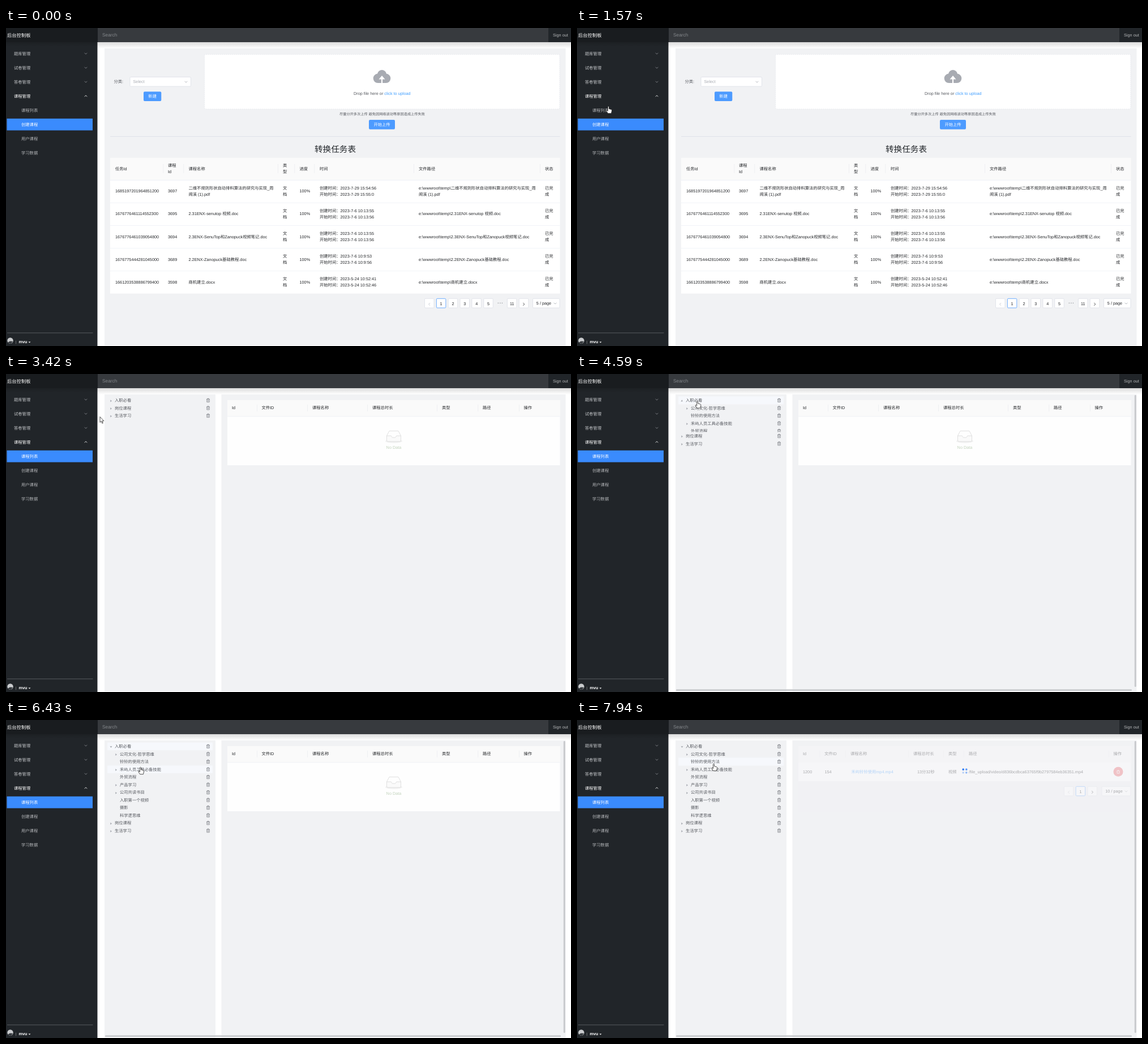
Write an HTML page that moves like this. It is 998 px wide and 561 px high and loops after 8 s.

```html
<!DOCTYPE html>
<html>
<head>
<meta charset="utf-8">
<title>后台控制板</title>
<style>
html, body { margin: 0; width: 998px; height: 561px; overflow: hidden; background: #fff; }
svg { display: block; }
text { font-family: "Liberation Sans", "Noto Sans CJK SC", "Noto Sans CJK", sans-serif; text-rendering: geometricPrecision; }
</style>
</head>
<body>
<script>
const PANEL = '#f1f2f4', BLUE = '#4d9bff', INK = '#26282b', GREY = '#56595f', EDGE = '#dcdfe6';
const ROW = 13.52, TREE_TOP = 39.75, CHILDREN = 9;

const rect = (x, y, w, h, fill, extra = '') =>
  `<rect x="${x}" y="${y}" width="${w}" height="${h}" fill="${fill}" ${extra}/>`;
const text = (x, y, s, fill = INK, size = 7.3, extra = '') =>
  `<text x="${x}" y="${y + size * .36}" font-size="${size}" fill="${fill}" ${extra}>${s}</text>`;
const centered = (x, y, s, fill, size) => text(x, y, s, fill, size, 'text-anchor="middle"');
const path = (d, stroke, x = 0, y = 0, extra = '') =>
  `<path d="${d}" transform="translate(${x} ${y})" fill="none" stroke="${stroke}" stroke-width=".8" ${extra}/>`;
const chevron = (x, y, color, up) => path(up ? 'M-2.3 1.2L0-1.2 2.3 1.2' : 'M-2.3-1.2L0 1.2 2.3-1.2', color, x, y);
const group = (id, body, extra = '') => `<g id="${id}" ${extra}>${body}</g>`;
const button = (x, y, w, label) => rect(x, y, w, 16.7, BLUE, 'rx="2"') + centered(x + w / 2, y + 8.3, label, '#fff');
const box = (x, y, w, h, stroke = EDGE) => rect(x, y, w, h, '#fff', `rx="1.5" stroke="${stroke}" stroke-width=".8"`);
const lines = (x, y, a, b) => b ? text(x, y - 5.8, a) + text(x, y + 5.8, b) : text(x, y, a);
const separators = (xs, y, h) => xs.map(x => rect(x, y, .7, h, '#e8eaee')).join('');

function pager(x, y, pages, selectX, selectW, label) {
  let out = '';
  ['<', ...pages, '>'].forEach((p, i) => {
    const px = x + i * 20.85, mid = px + 8.3, arrow = p === '<' || p === '>';
    if (p === '…') out += [-3.5, 0, 3.5].map(d => `<circle cx="${mid + d}" cy="${y + 8}" r=".8" fill="#909399"/>`).join('');
    else out += box(px, y, 16.5, 16.5, p === 1 ? BLUE : EDGE) + (arrow
      ? path(p === '<' ? 'M1.3-2.3L-1.3 0 1.3 2.3' : 'M-1.3-2.3L1.3 0-1.3 2.3', p === '<' ? '#c0c4cc' : INK, mid, y + 10)
      : centered(mid, y + 9, p));
  });
  return out + box(selectX, y, selectW, 16.5) + text(selectX + 6.3, y + 8, label) + chevron(selectX + selectW - 8, y + 8.5, '#a8abb2');
}

// Frame around the pages
const frame = () => {
  let out = rect(161.5, 25, 836.5, 11, 'url(#shade)') + rect(0, 0, 161.5, 561, '#212529') + rect(0, 25, 161.5, 8, 'url(#shade)') +
    rect(0, 0, 162, 25, '#191c1f') + rect(162, 0, 796, 25, '#373a3e') + rect(958, 0, 40, 25, '#212529') +
    text(2, 13, '后台控制板', '#fff', 8.3, 'font-weight="500"') + text(170, 12.3, 'Search', '#85888c', 8.3) + text(966, 12, 'Sign out', '#b5b7b9');
  ['题库管理', '试卷管理', '答卷管理', '课程管理'].forEach((s, i) => {
    const open = i === 3, y = 45 + i * 25;
    out += text(14, y, s, open ? '#fff' : '#c2c4c7', 7.3, open ? 'font-weight="500"' : '') + chevron(141, y, open ? '#fff' : '#8b8f93', open);
  });
  out += rect(1.5, 159.8, 151.5, 20.8, '#3a8bfd', 'id="active"');
  ['课程列表', '创建课程', '用户课程', '学习数据'].forEach((s, i) => out += text(27, 145 + i * 25, s, '#b5b7ba', 7.3, 'class="item"'));
  return out + rect(2, 537.5, 151.5, .8, '#676b6f') +
    '<circle cx="7.5" cy="551.5" r="5.2" fill="#c9cbcd"/><path d="M3 556Q5 551 12 553L9 557Z" fill="#34383c"/>' +
    text(17, 554, '|', '#aaa', 6) + text(22.5, 553.5, 'mvu', '#fff', 7.3, 'font-weight="700"') + '<path d="M39.5 553.5h4l-2 2z" fill="#fff"/>';
};

// Upload form with the task table
const createPage = () => {
  const tasks = [
    ['1685197201964851200', 3697, ['二维不规则形状自动排料算法的研究与实现_周', '闻溪 (1).pdf'], '7-29 15:54:56', '7-29 15:55:0'],
    ['1676776461114552300', 3695, ['2.31ENX-senutop 视频.doc'], '7-6 10:13:55', '7-6 10:13:56'],
    ['1676776461039054800', 3694, ['2.3ENX-SenuTop和Zanopuck视频笔记.doc'], '7-6 10:13:55', '7-6 10:13:56'],
    ['1676775444281045000', 3689, ['2.2ENX-Zanopuck基础教程.doc'], '7-6 10:9:53', '7-6 10:9:56'],
    ['1661203538886799400', 3598, ['商机建立.docx'], '5-24 10:52:41', '5-24 10:52:46']];
  const cloud = 'M544 864V672h128L512 480 352 672h128v192H320v-1.6c-5.4.3-10.5 1.6-16 1.6A240 240 0 0 1 64 624c0-123 93-223.5 212.6-237.2A239.8 239.8 0 0 1 512 192a239.9 239.9 0 0 1 235.5 194.8c119.5 13.7 212.5 114 212.5 237.2a240 240 0 0 1-240 240c-5.4 0-10.6-1.3-16-1.6v1.6z';
  let out = rect(174, 36, 814.5, 524, PANEL) +
    text(190.5, 94.5, '分类:', GREY) + box(219, 86.5, 107.5, 16.5) + text(224.5, 94.5, 'Select', '#a8abb2') + chevron(318, 95, '#a8abb2') +
    button(243, 112.3, 31.3, '新建') +
    rect(350.5, 46.5, 627.5, 96.5, '#fff', `rx="3" stroke="${EDGE}" stroke-width=".6" stroke-dasharray="2 1.5"`) +
    `<path d="${cloud}" transform="translate(646.5 67.5) scale(.0342)" fill="#a8abb2"/>` +
    text(614, 115.7, `Drop file here or <tspan fill="#409eff">click to upload</tspan>`, GREY) +
    centered(664.5, 152, '尽量分开多次上传 避免因网络波动等原因造成上传失败', GREY, 6.22) + button(641, 162, 46, '开始上传') +
    rect(184, 191, 794.5, .8, EDGE) + centered(581.5, 213.5, '转换任务表', '#212529', 14.6) +
    rect(184, 229, 794.5, 39.5, '#fafafa') + rect(184, 268.5, 794.5, 200, '#fff') + separators([277.5, 313.5, 480, 509.5, 544.5, 720, 943], 240, 16) +
    lines(193, 248, '任务Id') + lines(286, 248, '课程', 'Id') + lines(322.5, 248, '课程名称') + lines(489, 248, '类', '型') +
    lines(518.5, 248, '进度') + lines(554, 248, '时间') + lines(729, 248, '文件路径') + lines(952, 248, '状态');
  tasks.forEach(([id, course, name, created, started], i) => {
    const y = 287.8 + i * 40.05;
    out += rect(184, y - 19.6, 794.5, .7, '#ebeef5') + lines(193, y, id) + lines(286, y, course) + lines(322.5, y, ...name) +
      lines(489, y, '文', '档') + lines(518.5, y, '100%') + lines(554, y, '创建时间：2023-' + created, '开始时间：2023-' + started) +
      lines(729, y, 'e:\\wwwroot\\temp\\' + name[0], name[1]) + lines(952, y, '已完', '成');
  });
  return out + pager(739.5, 477.3, [1, 2, 3, 4, 5, '…', 11], 930.5, 47.5, '5 / page');
};

// Course tree with the course table
const treeRow = (x, y, [arrow, label]) =>
  (arrow ? `<path class="arrow" d="M-1.2-2L1.5 0-1.2 2z" transform="translate(${x - 6.5} ${y + 1})" fill="#a8abb2"/>` : '') +
  text(x, y, label, GREY) +
  path('M-3-2H3M-1.2-2V-3.2H1.2V-2M-2.2-2V3H2.2V-2M-.7-.3V1.5M.7-.3V1.5', '#70737a', 357, y, 'style="stroke-width:.7"');
const rowY = i => TREE_TOP + ROW * (i + .5);

const tree = () => {
  const children = [[1, '公司文化-哲学思维'], [0, '铃铃的使用方法'], [1, '禾屿人员工具必备技能'], [0, '外贸流程'], [1, '产品学习'],
    [1, '公司共读书目'], [0, '入职第一个视频'], [0, '摄影'], [0, '科学逻思维']];
  return rect(179, 0, 186, ROW, '#f6f8fc', 'id="selected"') + rect(179, 0, 186, ROW, '#f6f8fc', 'id="hover"') +
    group('root', treeRow(192, rowY(0), [1, '入职必看'])) +
    group('children', children.map((c, i) => treeRow(201, rowY(i + 1), c)).join(''), 'clip-path="url(#reveal)"') +
    group('rest', treeRow(192, rowY(1), [1, '岗位课程']) + treeRow(192, rowY(2), [1, '生活学习']));
};

const header = (cells, lineXs) => rect(391, 46, 587.5, 29, '#fafafa') + separators(lineXs, 54, 12) +
  cells.map(([x, s]) => text(x, 59.5, s)).join('');

const emptyTable = () => rect(391, 46, 587.5, 115, '#fefefe') +
  header([[399, 'Id'], [451.5, '文件ID'], [541, '课程名称'], [647, '课程总时长'], [770, '类型'], [842, '路径'], [914.5, '操作']],
    [443, 532, 638, 761, 833.5, 906]) + rect(391, 74.5, 587.5, .7, '#ebeef5') +
  '<ellipse cx="685" cy="118.5" rx="15" ry="3.3" fill="#f1f1f1"/>' +
  path('M672.5 109L677 100.5H693L697.5 109', '#d9d9d9') +
  path('M672.5 109h7.5c1.5 0 1 3 2.5 3h5c1.5 0 1-3 2.5-3h7.5v8q0 2-2 2h-21q-2 0-2-2z', '#d9d9d9', 0, 0, 'style="fill:#fafafa"') +
  centered(685, 129.5, 'No Data', '#c3d3bd');

const dataTable = () => rect(391, 46, 587.5, 62, '#fff') +
  header([[399, 'Id'], [437, '文件ID'], [483, '课程名称'], [594, '课程总时长'], [656, '类型'], [692, '路径'], [947.5, '操作']],
    [428.5, 474, 585, 647, 683, 939]) +
  [[399, 1200], [437.5, 154], [601, '13分32秒'], [656, '视频'], [692, '/file_upload/video/d836bcdbca63765f9b2797584eb36351.mp4']]
    .map(([x, s]) => text(x, 91, s)).join('') +
  text(484.5, 91, '禾屿铃铃使用mp4.mp4', '#409eff') +
  '<circle cx="956" cy="91.3" r="8.5" fill="#ee6a70"/>' + path('M-2.5-1.5H2.5M-1-2.5H1M-2-1.5V2.7H2V-1.5', '#fff', 956, 91.3) +
  pager(860.3, 117.3, [1], 927, 51, '10 / page');

const spinner = () => [1, .75, .5, .3].map((o, i) =>
  `<circle cx="${4 * Math.cos(i * Math.PI / 2)}" cy="${4 * Math.sin(i * Math.PI / 2)}" r="1.8" fill="#2f7df6" opacity="${o}"/>`).join('');

const listPage = () => rect(174, 36, 196, 524, PANEL) + rect(380.5, 36, 608, 524, PANEL) +
  group('noData', centered(272, 55.5, 'No Data', '#8b8e94')) + group('tree', tree()) +
  group('empty', emptyTable()) + group('data', dataTable()) +
  group('loading', rect(390, 45, 589.5, 117, PANEL, 'id="mask" opacity=".65"') + group('spinner', spinner()));

document.body.innerHTML = `<svg width="998" height="561" viewBox="0 0 998 561">
<defs><linearGradient id="shade" x2="0" y2="1"><stop stop-opacity=".14"/><stop offset="1" stop-opacity="0"/></linearGradient>
<clipPath id="reveal"><rect id="revealBox" x="174" y="${TREE_TOP + ROW}" width="196" height="0"/></clipPath></defs>` +
  frame() + group('list', listPage()) + group('create', createPage()) +
  rect(984.8, 37, 3, 515, '#c8cacd', 'id="barY" rx="1.5"') + rect(175, 556.3, 805, 2.7, '#c8cacd', 'id="barX" rx="1.3"') +
  group('cursor',
    path('M0 0V9.8L2.3 7.8 3.9 11.6 5.4 11 3.8 7.3H7Z', '#222', 0, 0, 'id="arrowShape" style="fill:#fff"') +
    path('M-1 1Q0-.7 1 1V4.6L5 5.7Q6.4 6.2 6.1 8L5 12.7H-.8L-3.4 8.8Q-4 7.2-2.5 7.2L-1 8.5Z', '#222', 0, 0, 'id="handShape" style="fill:#fff"')) + '</svg>';

const $ = id => document.getElementById(id);
const show = (id, on) => $(id).setAttribute('visibility', on ? 'inherit' : 'hidden');
const set = (id, name, value) => $(id).setAttribute(name, value);
const ramp = (t, a, b) => Math.min(1, Math.max(0, (t - a) / (b - a)));
const ease = p => p * p * (3 - 2 * p);

// time, x, y of the pointer tip
const track = [[460, 880, 470], [800, 420, 330], [1250, 197, 262], [1320, 180, 248], [1570, 55.5, 138], [1960, 50.5, 142.5],
  [3080, 50.5, 142.5], [3420, 166, 75.5], [3870, 214, 57], [4130, 212, 47], [4460, 212, 47], [5250, 221.5, 52.5],
  [5380, 221.5, 52.5], [5830, 225, 63], [6030, 225, 63], [6430, 237.5, 83], [6630, 241.5, 77], [8000, 241.5, 77]];

function pointer(t) {
  const i = Math.max(1, track.findIndex(k => k[0] > t));
  const [t0, x0, y0] = track[i - 1], [t1, x1, y1] = track[i], p = ease(ramp(t, t0, t1));
  return [x0 + (x1 - x0) * p, y0 + (y1 - y0) * p];
}

function draw() {
  const t = performance.now() % 8000, [x, y] = pointer(t);
  const inMenu = x < 153 && y > 134 && y < 157, inTree = t > 3400 && x > 179 && x < 365;

  show('cursor', t >= 460);
  set('cursor', 'transform', `translate(${x} ${y})`);
  show('handShape', inMenu || inTree);
  show('arrowShape', !inMenu && !inTree);

  const active = t < 2290 ? 1 : 0;
  set('active', 'y', 134.8 + active * 25);
  document.querySelectorAll('.item').forEach((el, i) =>
    el.setAttribute('fill', i === active || (i === 0 && inMenu && t > 1640) ? '#fff' : '#b5b7ba'));

  show('create', t < 2100);
  set('create', 'opacity', t < 1960 ? 1 : .4);
  show('list', t >= 1960);
  show('noData', t < 2350);
  show('tree', t >= 2350);

  const open = ease(ramp(t, 4460, 4760)), height = open * CHILDREN * ROW;
  set('revealBox', 'height', height);
  set('rest', 'transform', `translate(0 ${height})`);
  $('root').querySelector('.arrow').setAttribute('transform', `translate(185.5 ${rowY(0) + 1}) rotate(${open * 90})`);
  // "inherit" keeps these rows hidden together with the tree
  show('selected', t >= 4460);
  set('selected', 'y', TREE_TOP + ROW * (t < 6890 ? 0 : 2));
  show('hover', inTree);
  set('hover', 'y', TREE_TOP + ROW * Math.floor((y - TREE_TOP) / ROW));

  show('empty', t < 7200);
  show('data', t >= 7200);
  show('loading', t >= 7030);
  set('mask', 'opacity', .65 * ramp(t, 6960, 7200));
  set('spinner', 'transform', `translate(685 90) rotate(${(t - 7940) * .3 + 225})`);

  const late = ramp(t, 3440, 3780);
  set('barY', 'opacity', t < 2000 ? ramp(t, 700, 1040) * (1 - ramp(t, 1320, 1540)) : late);
  set('barX', 'opacity', late);
  requestAnimationFrame(draw);
}
draw();
</script>
</body>
</html>
```
